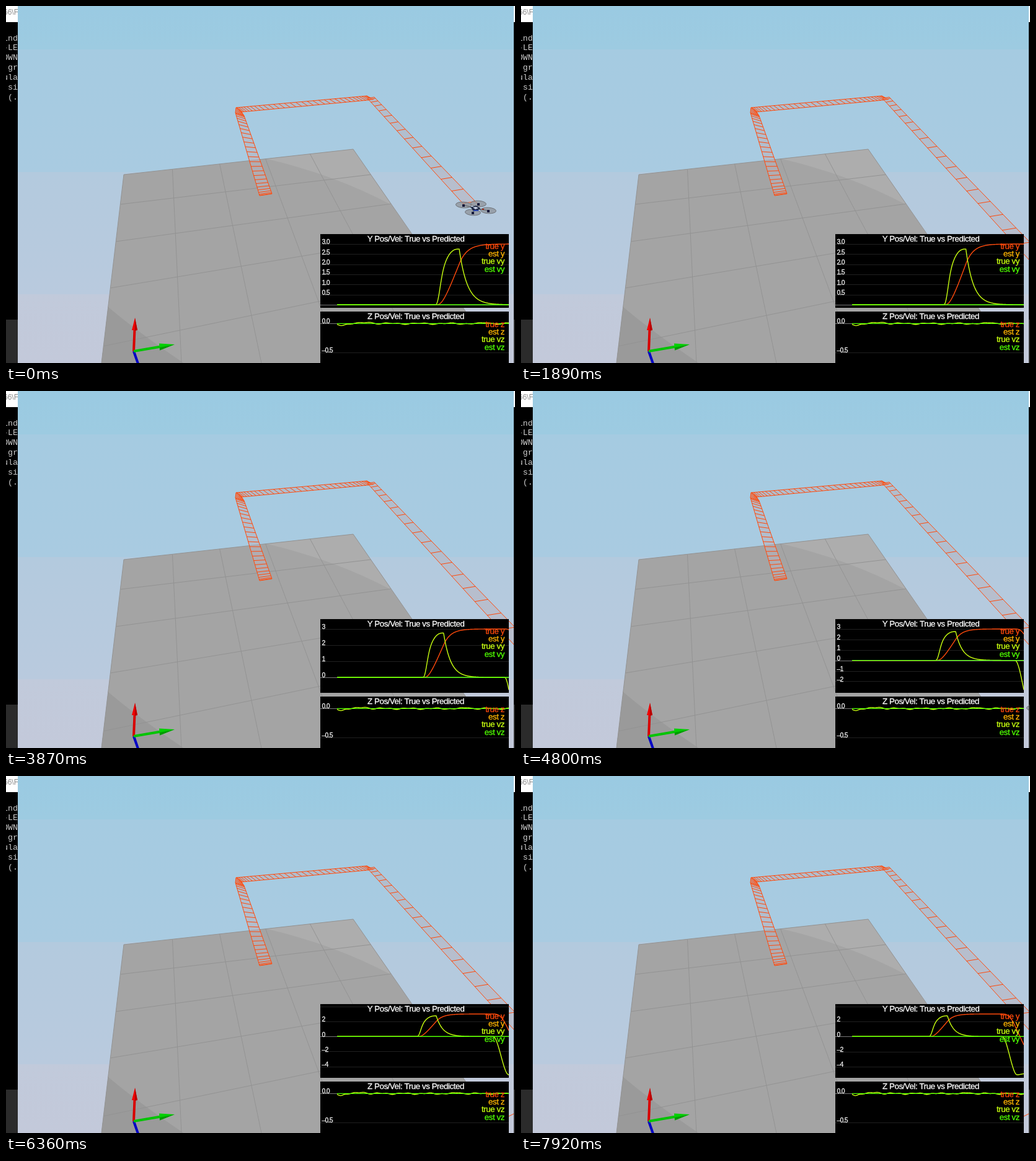
Write an HTML page with a canvas that moves like this. It is 821 by 576 pixels and loops after 8.02 s.

```html
<!DOCTYPE html>
<html lang="en">
<head>
<meta charset="utf-8">
<title>Quadrotor simulation</title>
<style>
  html, body { margin: 0; width: 100%; height: 100%; overflow: hidden; background: #000; }
  canvas { display: block; width: 821px; height: 576px; }
</style>
</head>
<body>
<canvas id="view" width="821" height="576"></canvas>
<script>
const ctx = document.getElementById('view').getContext('2d');
const SANS = '"Liberation Sans", Arial, sans-serif';
const MONO = '"Liberation Mono", monospace';
const ORANGE = '#ff4a0c', AMBER = '#ffb400', LIME = '#c8ff10', GREEN = '#50ff00';
const LOOP = 8020, STEP = 132, PLOT = 277;

const lerp = (a, b, t) => a + (b - a) * t;
const mix = (p, q, t) => [lerp(p[0], q[0], t), lerp(p[1], q[1], t)];
const smooth = t => t * t * (3 - 2 * t);
const unit = t => Math.min(1, Math.max(0, t));
const fractions = (n, ease) => Array.from({ length: n + 1 }, (_, i) => ease(i / n));

// Flight time covered by the charts at step k, in plot pixels of the first picture
const span = k => PLOT * (1 + 0.0054 * k - 0.000012 * k * k);

// Forward dash with a settling tail, then the faster way back
function velY(p) {
  const q = unit((p - 158) / 38);
  const rise = (1 - (1 - q) ** 2.5) * (1 - Math.exp(-((q / 0.2) ** 2)));
  const settle = Math.exp(-Math.max(0, p - 197) / 13);
  return 2.75 * rise * settle - 5.1 * smooth(unit((p - 310) / 31)) + 0.012 * Math.max(0, p - 343);
}

// Position is the running sum of the velocity, scaled to reach 3 m
const sums = [0];
for (let p = 0; p < 360; p++) sums.push(sums[p] + velY(p + 0.5));
function posY(p) {
  const i = Math.floor(p);
  return 3 * lerp(sums[i], sums[i + 1], p - i) / sums[300];
}

const bump = (p, c, w) => Math.exp(-(((p - c) / w) ** 2));
const velZ = p => 2.6 * bump(p, 8, 7) - 2.2 * bump(p, 50, 11) - 1.8 * bump(p, 242, 7) +
  0.8 * Math.sin(p * 0.13) + 0.6 * Math.sin(p * 0.29 + 1);

function path(pts, close) {
  ctx.beginPath();
  pts.forEach(p => ctx.lineTo(p[0], p[1]));
  if (close) ctx.closePath();
}
function line(a, b, color, width = 1) {
  path([a, b]);
  ctx.strokeStyle = color;
  ctx.lineWidth = width;
  ctx.stroke();
}
function poly(pts, color) {
  path(pts, true);
  ctx.fillStyle = color;
  ctx.fill();
}
function rect(x, y, w, h, color) {
  ctx.fillStyle = color;
  ctx.fillRect(x, y, w, h);
}
function text(str, x, y, size, color, align = 'left', font = SANS, spacing = 0) {
  ctx.font = size + 'px ' + font;
  ctx.letterSpacing = spacing + 'px';
  ctx.textAlign = align;
  ctx.textBaseline = 'middle';
  ctx.fillStyle = color;
  ctx.fillText(str, x, y);
}
// Chart lettering: tight and slightly heavy
function label(str, x, y, size, color, align, spacing = -0.43) {
  text(str, x, y, size, color, align, SANS, spacing);
  ctx.strokeStyle = color;
  ctx.lineWidth = 0.3;
  ctx.strokeText(str, x, y);
}
function clip(x, y, w, h, draw) {
  ctx.save();
  ctx.beginPath();
  ctx.rect(x, y, w, h);
  ctx.clip();
  draw();
  ctx.restore();
}

function desktop() {
  rect(0, 0, 821, 576, '#000');
  rect(0, 0, 821, 26, '#fff');
  rect(0, 506, 821, 70, '#2b2b2b');
  text('66\\F', -4, 11, 12, '#8c8c8c');
  ['ind', '-LE', 'OWN', ' gr', 'ula', ' si', ' (.'].forEach((s, i) =>
    text(s, -5, 52 + i * 15.9, 13.33, '#ccc', 'left', MONO));
}

function band(y, h, from, to) {
  const g = ctx.createLinearGradient(0, y, 0, y + h);
  g.addColorStop(0, from);
  g.addColorStop(1, to);
  rect(19, y, 800, h, g);
}
function sky() {
  band(0, 70, '#9acae2', '#9dcbe1');
  band(70, 198, '#a5cbe1', '#a9cbe1');
  band(268, 197, '#b3cade', '#b9cade');
  band(465, 111, '#c1cadb', '#c3c9da');
}

function shade(from, ctrl, to, corner, color) {
  ctx.beginPath();
  ctx.moveTo(...from);
  ctx.quadraticCurveTo(...ctrl, ...to);
  ctx.lineTo(...corner);
  ctx.fillStyle = color;
  ctx.fill();
}
function ground() {
  const [tl, tr, br, bl] = [[190, 272], [560, 231], [799, 576], [154, 576]];
  const grid = '#939393';
  ctx.save();
  path([tl, tr, br, bl], true);
  ctx.clip();
  rect(19, 200, 800, 376, '#a4a4a4');
  shade([418, 246], [530, 272], [622, 321], [640, 220], '#adadad');
  shade([164, 485], [215, 528], [288, 577], [150, 577], '#9a9a9a');
  ctx.restore();
  for (let i = 0; i <= 5; i++) {
    const t = i / 5;
    line(mix(tl, tr, t + 0.075 * t * (1 - t)), mix(bl, br, t), grid);
  }
  // rows widen towards the viewer
  for (let i = 0; i <= 4; i++) {
    const left = 48 * (1.25 ** i - 1) / 0.25, right = 41 * (1.15 ** i - 1) / 0.15;
    line(mix(tl, bl, left / 304), mix(tr, br, right / 345), grid);
  }
}

function axes() {
  const o = [206, 557];
  line(o, [213, 577], '#0000c4', 4);
  line(o, [207.5, 521], '#d80000', 4);
  poly([[203, 523], [208, 503], [212, 523]], '#f00000');
  poly([[208, 503], [212, 523], [208, 524]], '#b80000');
  line(o, [250, 549.5], '#00c400', 4);
  poly([[247, 544.5], [272, 546], [248, 555.5]], '#00d000');
  poly([[272, 546], [248, 555.5], [248, 551]], '#009a00');
}

// Ladder between the edges a0-a1 and b0-b1, rungs at the fractions given
function ribbon(a0, a1, b0, b1, rungs) {
  poly([a0, a1, b1, b0], 'rgba(186,180,192,.55)');
  line(a0, a1, ORANGE);
  line(b0, b1, ORANGE);
  rungs.forEach(t => line(mix(a0, a1, t), mix(b0, b1, t), ORANGE));
}
function trail() {
  ribbon([409, 306], [370, 172], [429, 303], [384, 177], fractions(25, smooth));
  ribbon([370, 172], [371, 164], [384, 177], [380, 171], fractions(4, t => t));
  ribbon([371, 164], [582, 145], [380, 171], [593, 151], fractions(34, smooth));
  ribbon([583, 149], [819, 409], [594, 147], [844, 405], fractions(18, t => t ** 1.7));
}

function rotor(x, y) {
  line([0, 2], [x, y], '#30343c', 1.5);
  ctx.beginPath();
  ctx.ellipse(x, y, 12.5, 4.8, 0.06, 0, 7);
  ctx.fillStyle = 'rgba(140,144,150,.7)';
  ctx.fill();
  ctx.strokeStyle = '#6e7278';
  ctx.lineWidth = 1;
  ctx.stroke();
  rect(x - 2, y - 1, 4, 4, '#14183a');
}
function drone(x, y) {
  ctx.save();
  ctx.translate(x, y);
  rotor(-20, -4);
  rotor(4, -6);
  rotor(20, 5);
  rotor(-5, 8);
  poly([[-8, 0], [0, -3], [7, 1], [2, 6], [-5, 5]], '#1c2440');
  poly([[-5, 0], [0, -1], [4, 1], [-1, 3]], '#c8d4e8');
  rect(-4, 4, 8, 2, '#2a48b0');
  rect(10, 2, 3, 2, '#a02818');
  ctx.restore();
}

function scene(k) {
  sky();
  ground();
  axes();
  const y = 325 + 15 * k;
  clip(19, 0, 800, y - 2, trail);
  drone(758 + 14 * k, y);
  // way back, seen only beside the charts
  if (k >= 39) line([811, 549], [819, 545], ORANGE);
  if (k > 34 && k < 46) drone(848 - 8 * (k - 36), 516 + 6 * (k - 36));
}

function plot(f, color) {
  ctx.beginPath();
  for (let x = 0; x <= PLOT; x += 0.5) ctx.lineTo(534 + x, f(x));
  ctx.strokeStyle = color;
  ctx.lineWidth = 1.4;
  ctx.stroke();
}
function title(axis, y) {
  label(axis + ' Pos/Vel: True vs Predicted', 661, y, 13.3, '#fff', 'center');
}
function legend(axis, y) {
  [['true ', ORANGE], ['est ', AMBER], ['true v', LIME], ['est v', GREEN]]
    .forEach(([s, c], i) => label(s + axis, 804, y + i * 12.3, 13.3, c, 'right'));
}
function tick(v, y, digits, named) {
  const row = Math.round(y) + 0.5;
  line([507, row], [811, row], v ? '#202020' : '#777');
  if (named)
    label((v < 0 ? '\u2013' : '') + Math.abs(v).toFixed(digits), 509.5, y - 2.5, 10.5, '#f4f4f4', 'left', -0.8);
}

function chartY(k) {
  const end = span(k), low = Math.min(0, velY(span(Math.min(k, 50))));
  const range = 3 - low, scale = 98 / range, zero = 384 + 3 * scale;
  const step = range <= 3.5 ? 0.5 : range <= 7 ? 1 : 2;
  rect(507, 368, 304, 119, '#000');
  for (let v = -6; v <= 4; v += step) {
    const y = zero - v * scale;
    if (y > 368 && y < 484) tick(v, y, step < 1 ? 1 : 0, y > 376 && y < 478);
  }
  const draw = (f, color) => plot(x => zero - f(x * end / PLOT) * scale, color);
  draw(posY, ORANGE);
  draw(velY, LIME);
  draw(() => 0, GREEN);
  title('Y', 376);
  legend('y', 388);
}

function chartZ(k) {
  const end = span(k);
  rect(507, 493, 304, 83, '#000');
  tick(0, 512, 1, true);
  tick(-0.5, 559, 1, true);
  plot(x => 512.4 + velZ(x * end / PLOT), LIME);
  plot(() => 512.4, GREEN);
  title('Z', 501);
  legend('z', 514);
}

function draw(k) {
  desktop();
  clip(19, 0, 800, 576, () => scene(k));
  clip(507, 368, 304, 119, () => chartY(k));
  clip(507, 493, 304, 83, () => chartZ(k));
}

let shown = -1;
function loop() {
  const k = Math.floor(performance.now() % LOOP / STEP);
  if (k !== shown) draw(shown = k);
  requestAnimationFrame(loop);
}
loop();
</script>
</body>
</html>
```
